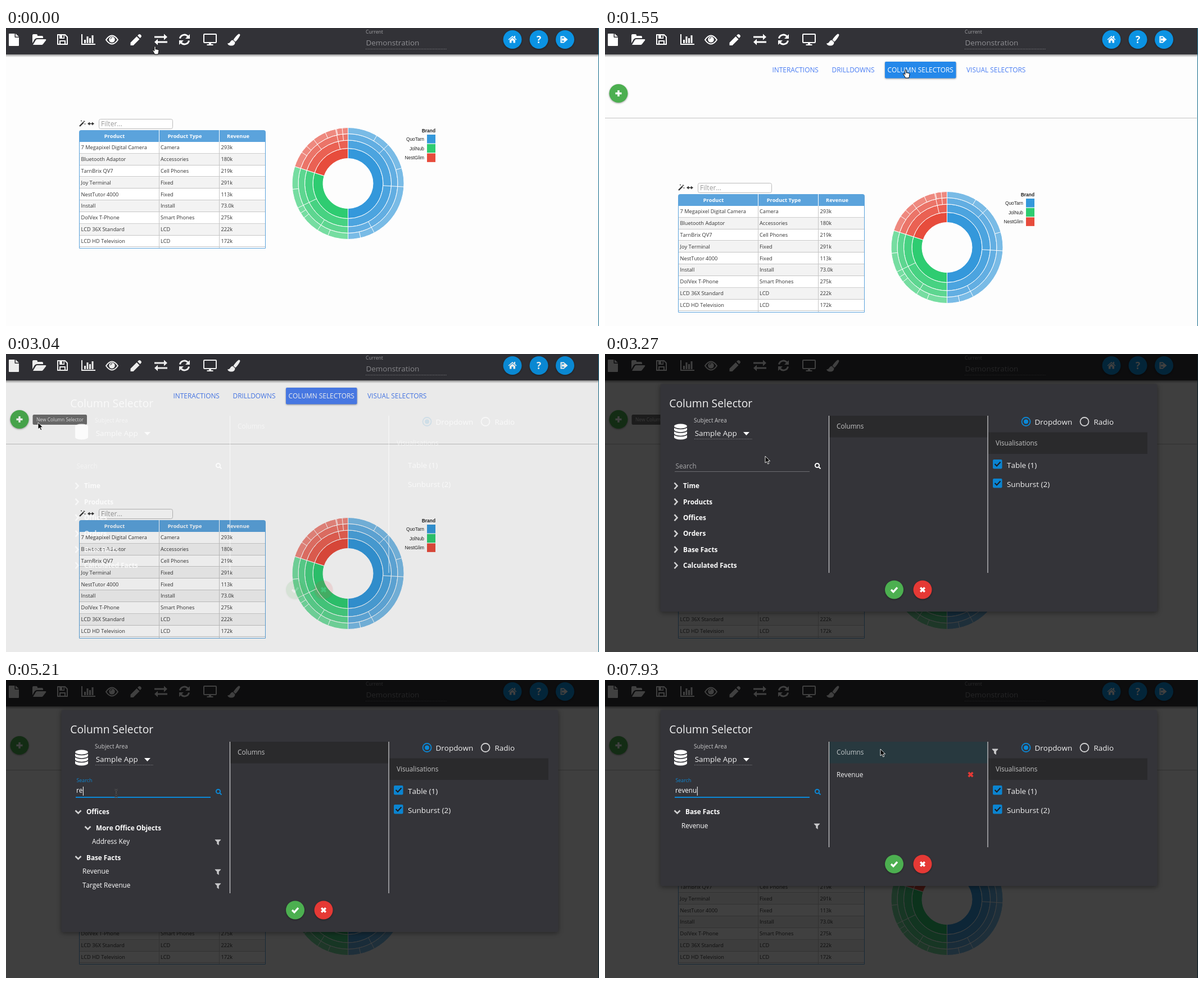
An HTML page for the animation above (8000 ms loop, 1055 by 531 pixels).

```html
<!DOCTYPE html>
<html lang="en">
<head>
<meta charset="utf-8">
<title>Column selector demo</title>
<style>
  html, body { margin: 0; width: 100%; height: 100%; overflow: hidden; background: #fdfdfd; }
  svg { display: block; width: 1055px; height: 531px; font: 11.76px "Open Sans", "Noto Sans", sans-serif; font-kerning: none; }
  .w { fill: #fff; }
  .soft { fill: #fff; fill-opacity: .72; }
  .line { fill: none; stroke: #fff; stroke-width: 2; }
  .b { font-weight: 700; }
  .mid { text-anchor: middle; }
  .end { text-anchor: end; }
  .tip { font-size: 8.4px; fill: #e8e8e8; }
  .cells { font-size: 9.24px; fill: #333; }
  .legend { font: 8.4px "Liberation Sans", Arial, sans-serif; fill: #222; }
  .tabs { font-size: 11.88px; }
  .big { font-size: 13.44px; }
  .dots { fill: none; stroke: #8c8c90; stroke-dasharray: 1 1.5; }
  .shade { filter: drop-shadow(0 1.5px 1.5px #0006); }
</style>
</head>
<body>
<svg viewBox="0 0 1055 531">
  <defs>
    <linearGradient id="fade" x2="0" y2="1">
      <stop stop-color="#000" stop-opacity=".4"/><stop offset="1" stop-color="#000" stop-opacity="0"/>
    </linearGradient>
    <path id="funnel" d="M-5-4.800h10q.6.500 0 1.100L1.700-.4V5.500l-3.400-2.500v-3.400L-5-3.700q-.6-.6 0-1.100z" fill="#c8c8ca"/>
    <path id="plus" d="M-5.500 0h11M0-5.500v11" stroke="#fff" stroke-width="3.400"/>
    <path id="cross" d="M-3.800-3.800l7.600 7.600M3.800-3.800l-7.600 7.600" stroke-width="3.600"/>
    <path id="tick" d="M-5.500 0l4 3.800 7-7.600" fill="none" stroke-width="3.400"/>
    <path id="bar" d="M-2.500-6.500q2.500 0 2.500 1.500v10q0 1.500-2.500 1.500M2.500-6.500Q0-6.500 0-5M2.500 6.500Q0 6.500 0 5M-1.500 2h3" fill="none"/>
  </defs>

  <rect width="1055" height="531" fill="#fdfdfd"/>

  <!-- Content that slides down when the tab bar opens -->
  <g id="content">
    <g stroke="#333" fill="#333">
      <path d="M131 175l7-7" stroke-width="2.400"/>
      <path d="M139 165v3M137.500 166.500h3M134 164.500v2M133 165.500h2M140.500 170v2M139.500 171h2" stroke-width=".8"/>
      <path d="M148 170.500h6" stroke-width="1.600"/>
      <path d="M145 170.500l4-3v6zM157 170.500l-4-3v6z" stroke="none"/>
    </g>
    <rect x="165.500" y="162.500" width="131" height="17" rx="3" fill="#fff" stroke="#bbb"/>
    <text x="169" y="175" font-size="12.1" fill="#999">Filter...</text>
    <g id="table"></g>
    <g id="rings" stroke="#fff"></g>
    <g id="legend" class="legend"><text x="764" y="186" class="b end">Brand</text></g>
  </g>

  <!-- Tab bar -->
  <g id="panel">
    <path d="M0 160.500h1053" stroke="#c2c2c2"/>
    <rect id="tab" y="60" height="29.500" rx="2" class="shade"/>
    <g id="tabs" class="tabs"></g>
    <circle cx="24" cy="116.500" r="16.500" fill="#4caf50" class="shade"/>
    <use href="#plus" x="24" y="116.500"/>
  </g>

  <!-- Toolbar -->
  <rect y="47" width="1055" height="5" fill="url(#fade)"/>
  <rect width="1055" height="47" fill="#323237"/>
  <g class="w">
    <path d="M5 11q0-1 1-1h9.500v6q0 1 1 1h6.500v14q0 1-1 1H6q-1 0-1-1zM17 10l6 5.500h-6z"/>
    <path d="M47 27V13q0-2 2-2h5q2 0 2 2v1h8q2 0 2 2v2H55q-2 0-4 2zM55 20h15q2 0 1 2l-5 6.500q-1 1.500-3 1.500H48l5-8.500q1-1.500 2-1.500z"/>
    <path d="M95 11h9v8h-9z"/><path d="M100 12.500h2.500v5H100z" fill="#323237"/>
    <path d="M139 21h3v6h-3zM143.500 15h3v12h-3zM148 18h3v9h-3zM152.500 13h3v14h-3z"/>
    <circle cx="188.500" cy="20.500" r="5.300"/><path d="M186 20q0-3 3-3" class="line" style="stroke:#323237;stroke-width:1"/>
    <path d="M221.500 26l11-11 5 5-11 11h-5zM234 13.500l2-2q1.500-1 3 0l1.500 1.500q1 1.500 0 3l-2 2z"/>
    <path d="M264 14.500h17v-4l6 5.500-6 5.500v-4h-17zM287 23.500h-17v-4l-6 5.500 6 5.500v-4h17z"/>
    <path d="M327 11v8h-8zM308 30v-8h8zM361 26h4v3h3.500v2h-11v-2h3.500z"/>
    <path d="M414 10.500q3.500 0 2 3.500-4 7.500-8 10.500l-3.500-3.500q5-7.500 9.500-10.500zM403.500 21.500l4 4q0 6-7 6-5 0-6.500-4 3 0 4.500-2 2-4 5-4z"/>
  </g>
  <g class="line">
    <path d="M92 12h13l4 4v13H92zM96 29v-6h9v6M135 11v18h24M178 21q5-7.500 10.500-7.500T199 21q-5 7.500-10.500 7.500T178 21z"/>
    <path d="M309.500 18.500a8 8 0 0 1 14-3.500M325.500 22.500a8 8 0 0 1-14 3.500" stroke-width="3"/>
    <rect x="352" y="11" width="22" height="15" rx="1"/>
  </g>
  <text x="640" y="10" font-size="8.6" fill="#a2a2a5">Current</text>
  <text x="640.500" y="31" class="big" fill="#8f8f93">Demonstration</text>
  <path d="M640 37.500h145" class="dots"/>
  <g fill="#0b93e3" class="shade">
    <circle cx="901" cy="20.500" r="16.500"/><circle cx="948" cy="20.500" r="16.500"/><circle cx="994.500" cy="20.500" r="16.500"/>
  </g>
  <g class="w">
    <path d="M901 14l7.500 6.500-1 1-6.500-5.500-6.500 5.500-1-1zM896 21.500l5-4.200 5 4.200v5h-3.500v-4h-3v4H896zM904 14h2v4l-2-1.500z"/>
    <text x="948" y="26.500" class="b mid" font-size="17">?</text>
    <path d="M993 18.500v-3.500l6.500 5.500-6.500 5.500v-3.500h-4v-4z"/>
    <path d="M993 15.500h-5.500v10h5.500" class="line"/>
  </g>
  <path d="M1053.500 52v479" stroke="#dde3e5"/>
  <path d="M1054.500 0v531" stroke="#2b7f9e"/>

  <g id="tipMenu">
    <rect x="245" y="45" width="59" height="18" rx="2" fill="#6f6f6f"/>
    <text x="274.500" y="57" class="tip mid">Interactions</text>
  </g>
  <g id="tipNew">
    <rect x="47.500" y="108" width="96.500" height="18" rx="2.500" fill="#6f6f6f"/>
    <text x="54" y="120" class="tip">New Column Selector</text>
  </g>

  <rect id="dim" width="1055" height="531"/>

  <!-- Dialog -->
  <g id="modal">
    <rect id="sheet" class="solid" x="98.500" y="53.500" width="884" rx="3" fill="#343439" style="filter:drop-shadow(0 2px 4px #0006)"/>
    <g id="words">
      <text x="114.300" y="95" font-size="19.3" class="w" fill-opacity=".93">Column Selector</text>
      <path d="M123 128.500a11.500 4 0 0 1 23 0v20a11.500 4 0 0 1-23 0z" class="w"/>
      <g id="discs" class="solid" fill="none" stroke="#343439" stroke-width="1.600"></g>
      <text x="158" y="122.300" font-size="10.08" class="soft">Subject Area</text>
      <text x="159.700" y="146" class="big w" fill-opacity=".93">Sample App</text>
      <path d="M246 139h11l-5.500 6z" class="w"/>
      <path d="M159 151.500h103" class="dots solid"/>

      <text id="label" x="125.500">Search</text>
      <rect id="rule" class="solid" x="124" width="240"/>
      <g id="lens" fill="none" stroke-width="2"><circle cx="377.500" cy="198.500" r="3.600"/><path d="M380 201l3.500 3.500"/></g>
      <text id="query" x="125" y="201.200" class="w"></text>
      <rect id="caret" y="190" width="1" height="16" class="w"/>

      <g id="tree"></g><g id="found"></g><g id="narrow"></g>
      <g id="target"></g>

      <g id="ghost"><text x="136" y="263.500" class="w">Revenue</text><use href="#funnel" x="377" y="260.500"/></g>
      <rect id="head" class="solid" x="399" y="110" width="281.500" height="38.500"/>
      <text x="412" y="133" class="soft">Columns</text>
      <g id="chosen">
        <text x="412" y="172.500" class="w" fill-opacity=".93">Revenue</text>
        <use href="#cross" x="650.500" y="168.500" stroke="#e53935"/>
      </g>
      <path id="seps" stroke="#fff" stroke-opacity=".78" stroke-width="1.200"/>
      <use id="ghostIcon" href="#funnel"/>
      <rect class="solid" x="682" y="139.500" width="283" height="38.500" fill="#2a2a2c"/>
      <text x="695" y="162.500" class="soft">Visualisations</text>
      <g class="big w" fill-opacity=".93">
        <text x="764.500" y="126.300">Dropdown</text><text x="869.500" y="126.300">Radio</text>
        <text x="715" y="202.500">Table (1)</text><text x="715" y="236.500">Sunburst (2)</text>
      </g>
      <circle cx="853" cy="120.500" r="7.500" fill="none" stroke="#fff" stroke-opacity=".78" stroke-width="1.800"/>
    </g>
    <g class="accent">
      <circle cx="749" cy="120.500" r="7.500" fill="none" stroke="#0b88d6" stroke-width="1.800"/>
      <circle cx="749" cy="120.500" r="4" fill="#0b88d6"/>
    </g>
    <g id="boxes" class="solid" fill="#0b84d0"></g>
    <g id="buttons" class="accent" stroke="#fff">
      <circle cx="514.500" r="16.500" fill="#4caf50" stroke="none" class="shade"/><use href="#tick" x="514.500"/>
      <circle cx="565" r="16.500" fill="#e53935" stroke="none" class="shade"/><use href="#cross" x="565"/>
    </g>
  </g>

  <g id="cursor">
    <path id="arrow" d="M0 0v12l2.800-2.400 2 4.400 2-.9-2-4.300h3.800z" fill="#000" stroke="#fff" stroke-width=".9"/>
    <path id="hand" d="M-1.200.5q1.200-2 2.400 0V5l1.600-.2 1.700.4 1.700.6q.9.400.8 1.500l-.6 4.200-1 2.500h-6l-1-2.500-3-4.500q.6-1.500 2-.4l1.400 1.500z" fill="#fff" stroke="#000"/>
    <g id="beam"><use href="#bar" stroke="#77777a" stroke-width="2"/><use href="#bar" stroke="#111" stroke-width=".9"/></g>
  </g>
</svg>

<script>
const LOOP = 8000;
const $ = id => document.getElementById(id);
const add = (id, markup) => $(id).insertAdjacentHTML('beforeend', markup);
const set = (id, attrs) => { for (const k in attrs) $(id).setAttribute(k, attrs[k]); };
const show = (id, on) => { $(id).style.display = on ? '' : 'none'; };
const text = (x, y, s, cls = '') => `<text x="${x}" y="${y}" class="${cls}">${s}</text>`;

function buildTable() {
  const rows = [
    ['7 Megapixel Digital Camera', 'Camera', '293k'], ['Bluetooth Adaptor', 'Accessories', '180k'],
    ['TarnBrix QV7', 'Cell Phones', '219k'], ['Joy Terminal', 'Fixed', '291k'],
    ['NestTutor 4000', 'Fixed', '113k'], ['Install', 'Install', '73.0k'],
    ['DolVex T-Phone', 'Smart Phones', '275k'], ['LCD 36X Standard', 'LCD', '222k'],
    ['LCD HD Television', 'LCD', '172k']
  ];
  const step = 20.83, top = 203;
  let out = '<rect x="130.5" y="190" width="331" height="203" fill="#fff"/>';
  rows.forEach((row, i) => {
    const y = top + i * step;
    if (i % 2) out += `<rect x="131" y="${y}" width="330" height="${step}" fill="#f3f3f3"/>`;
    out += `<path d="M131 ${Math.round(y + step) - .5}h330" stroke="#c6c6c6"/><g class="cells">` +
      row.map((s, c) => text([133.5, 275, 382.5][c], y + 13.2, s)).join('') + '</g>';
  });
  out += '<path d="M272.5 203v190M379.5 203v190" stroke="#c6c6c6"/>' +
    '<path d="M130.5 200v192.500h331V200" fill="none" stroke="#5ba3dc"/>' +
    '<path d="M130 203v-17q0-4 4-4h324q4 0 4 4v17z" fill="#5ba3dc"/>' +
    '<path d="M272.5 182v21M379.5 182v21" stroke="#fff"/><g class="b mid w" font-size="9.24">' +
    text(193, 196, 'Product') + text(318, 196, 'Product Type') + text(413, 196, 'Revenue') + '</g>';
  add('table', out);
}

function buildRings() {
  const cx = 608.5, cy = 277, radii = [44.5, 62.5, 77, 88.5, 99.5], alpha = [1, .88, .77, .65];
  const brands = [['QuoTarn', '#3498db', 0, 180], ['JolNub', '#2ecc71', 180, 287.7], ['NestGlim', '#e74c3c', 287.7, 360]];
  // [angle, first ring the division starts in]
  const splits = [[31, 3], [46, 2], [74, 3], [93.5, 1], [152, 2], [167, 3], [201, 3], [213, 2], [232, 3], [238, 3],
    [244, 1], [264, 3], [304, 3], [312, 3], [322, 2], [336, 3], [347, 1], [348, 3], [354, 2]];
  const pt = (deg, r) => {
    const a = deg * Math.PI / 180;
    return `${(cx + r * Math.sin(a)).toFixed(2)} ${(cy - r * Math.cos(a)).toFixed(2)}`;
  };
  brands.forEach(([name, color, a, b], i) => {
    for (let k = 0; k < 4; k++) {
      const r = radii[k], R = radii[k + 1];
      add('rings', `<path d="M${pt(a, R)}A${R} ${R} 0 0 1 ${pt(b, R)}L${pt(b, r)}A${r} ${r} 0 0 0 ${pt(a, r)}z" fill="${color}" fill-opacity="${alpha[k]}"/>`);
    }
    const y = 190 + i * 16.7;
    add('legend', text(744, y + 11, name, 'end') + `<rect x="749" y="${y}" width="15" height="15.5" fill="${color}"/>`);
  });
  for (const [a, k] of splits) add('rings', `<path d="M${pt(a, radii[k])}L${pt(a, 99.5)}"/>`);
}

const chevron = (x, y, open) =>
  `<path d="M${x} ${y}${open ? 'm-5-2.500l5 5 5-5' : 'm-2.500-5.500l5 5.500-5 5.500'}" fill="none" stroke="#fff" stroke-opacity=".78" stroke-width="2.600"/>`;
const folder = (x, y, s, open = true) => chevron(x, y, open) + text(x + (open ? 14.5 : 13), y + 4.2, s, 'b w');
const leaf = (x, y, s) => text(x, y + 4, s, 'w') + `<use href="#funnel" x="377" y="${y + 1}"/>`;

function buildDialog() {
  ['Time', 'Products', 'Offices', 'Orders', 'Base Facts', 'Calculated Facts']
    .forEach((s, i) => add('tree', folder(126, 235 + i * 28.35, s, false)));
  add('found', folder(128.5, 235, 'Offices') + folder(145.5, 263.5, 'More Office Objects') + leaf(153, 288, 'Address Key') +
    folder(128.5, 316.5, 'Base Facts') + leaf(136, 341, 'Revenue') + leaf(136, 366, 'Target Revenue'));
  add('narrow', folder(128.5, 235, 'Base Facts') + leaf(136, 259.5, 'Revenue'));
  add('target', leaf(136, 284, 'Target Revenue'));
  for (const y of [129.5, 136, 142.5]) add('discs', `<path d="M123 ${y}a11.500 4 0 0 0 23 0"/>`);
  for (const y of [188, 222]) add('boxes', `<rect x="690" y="${y}" width="16.500" height="16.500" rx="2"/>` +
    `<path d="M693.500 ${y + 8}l3.500 3.500 6.500-7" fill="none" stroke="#1c1c20" stroke-width="2"/>`);
}

const tabs = [['INTERACTIONS', 297.5], ['DRILLDOWNS', 403.5], ['COLUMN SELECTORS', 502.5], ['VISUAL SELECTORS', 643]];
tabs.forEach(([s, x]) => add('tabs', text(x, 79, s)));
buildTable();
buildRings();
buildDialog();

// Each track: [time, value...], held until the next entry
const pointer = [
  [0, 265, 33, 'hand'], [150, 270, 30, 'hand'], [330, 273, 28, 'hand'],
  [1100, 300, 60, 'arrow'], [1250, 385, 92, 'arrow'], [1400, 482, 88, 'arrow'], [1550, 535, 75, 'hand'],
  [1850, 515, 97, 'arrow'], [2000, 430, 135, 'arrow'], [2150, 330, 168, 'arrow'], [2300, 230, 176, 'arrow'],
  [2440, 140, 166, 'arrow'], [2590, 75, 143, 'arrow'], [2740, 38, 121, 'arrow'], [2890, 30, 115, 'arrow'],
  [3040, 57, 122, 'arrow'], [3270, 285, 182, 'arrow'],
  [3540, 276, 216, 'arrow'], [3690, 250, 212, 'arrow'], [3840, 222, 205, 'beam'], [4000, 203, 202, 'beam'], [4150, 196, 202, 'beam'],
  [5810, 195, 206, 'beam'], [5960, 190, 226, 'arrow'], [6110, 186, 250, 'arrow'], [6250, 181, 270, 'arrow'],
  [6400, 176, 262, 'arrow'], [6540, 173, 256, 'arrow'],
  [6840, 178, 254, 'arrow'], [6990, 215, 240, 'arrow'], [7150, 280, 215, 'arrow'], [7300, 350, 185, 'arrow'],
  [7450, 410, 165, 'arrow'], [7600, 450, 140, 'arrow'], [7760, 471, 130, 'arrow'], [7930, 490, 123, 'arrow']
];
const typed = [[0, ''], [5210, 're'], [5360, 'rev'], [5510, 'revenu']];
const menuTip = [[0, 0], [150, .5], [330, 1], [1100, 0]];
const newTip = [[0, 0], [2740, .5], [2890, 1], [3540, 0]];
const dimming = [[0, 0], [3040, .075], [3270, .75]];
const lift = [[0, 0], [4150, .25], [4300, .7], [4460, 1]];
const ink = [[0, '#ffffff90'], [4460, '#4d94c2'], [4610, '#2a8cca'], [4760, '#0b88d6']];
const bottom = [[0, 390], [5210, 380], [5360, 298]];
const at = (track, t) => track.findLast(step => step[0] <= t).slice(1);

function drawTabs(t) {
  const active = t < 1550 ? 0 : 2;
  set('tab', active
    ? { x: 498, width: 126.5, fill: t < 1850 ? '#2488ea' : '#4d80f3' }
    : { x: 292.5, width: 93, fill: '#4d80f3' });
  [...$('tabs').children].forEach((el, i) => el.setAttribute('fill', i === active ? '#fff' : '#4a7df3'));
}

function drawDialog(t, x, y) {
  const solid = t >= 3270, focus = t >= 4150, drag = t >= 6840;
  const [end] = at(bottom, t), [up] = at(lift, t);
  document.querySelectorAll('.solid').forEach(el => el.style.opacity = +solid);
  document.querySelectorAll('.accent').forEach(el => el.style.opacity = solid ? 1 : .12);
  $('words').style.opacity = solid ? 1 : .8;
  set('sheet', { height: end + 15.5 });
  set('seps', { d: `M398.500 110V${end}M681 110V${end}` });
  set('buttons', { transform: `translate(0 ${end + 30})` });

  set('label', { y: 203.5 - 21.2 * up, 'font-size': 11.76 * (1 - up / 4), fill: at(ink, t)[0] });
  set('rule', focus ? { y: 208, height: 2, fill: '#0b88d6' } : { y: 209, height: 1, fill: '#6c6c70' });
  set('lens', { stroke: focus ? '#0b88d6' : '#fff' });
  $('query').textContent = at(typed, t)[0];
  set('caret', { x: 125.5 + $('query').getComputedTextLength() });
  show('caret', t >= 4300 && !(t >= 5960 && t < 6400));

  show('tree', t < 5210);
  show('found', t >= 5210 && t < 5360);
  show('narrow', t >= 5360);
  show('target', t >= 5360 && !drag);
  show('ghost', drag);
  show('ghostIcon', drag);
  set('ghost', { transform: `translate(${x - 173} ${y - 256})` });
  set('ghostIcon', { x: x + 204, y: y + 4.5 });
  set('head', { fill: t >= 7930 ? '#28393f' : '#2a2a2c' });
  show('chosen', t >= 7600);
}

function draw(t) {
  const [x, y, shape] = at(pointer, t);
  set('cursor', { transform: `translate(${x} ${y})` });
  for (const s of ['arrow', 'hand', 'beam']) show(s, s === shape);
  set('content', { transform: `translate(0 ${t >= 630 ? 114 : 0})` });
  set('tipMenu', { opacity: at(menuTip, t)[0] });
  set('tipNew', { opacity: at(newTip, t)[0] });
  set('dim', { opacity: at(dimming, t)[0] });
  show('panel', t >= 630);
  show('modal', t >= 3040);
  drawTabs(t);
  if (t >= 3040) drawDialog(t, x, y);
}

let start;
function tick(now) {
  start ??= now;
  draw((now - start) % LOOP);
  requestAnimationFrame(tick);
}
draw(0);
requestAnimationFrame(tick);
</script>
</body>
</html>
```
